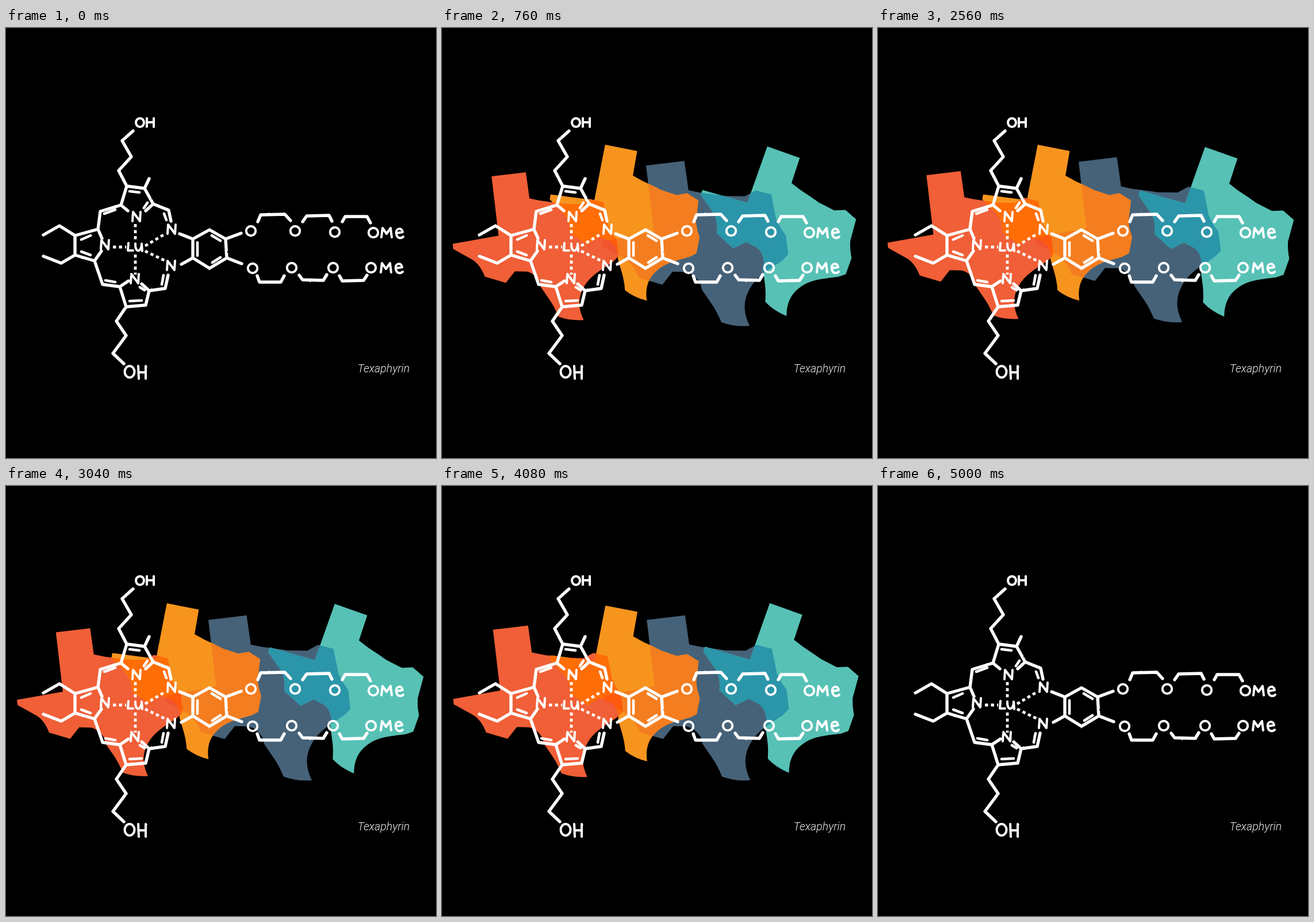
Animation of 748x748 px, one loop 5040 ms. Source, as an HTML page with a canvas:

```html
<!DOCTYPE html>
<html lang="en">
<head>
<meta charset="utf-8">
<title>Texaphyrin</title>
<style>
html, body { margin: 0; width: 100%; height: 100%; overflow: hidden; background: #000; }
canvas, svg { position: absolute; left: 0; top: 0; width: 748px; height: 748px; }
.chalk { fill: none; stroke: #fff; stroke-linecap: round; stroke-linejoin: round; filter: url(#rough); }
.bond { stroke-width: 5.4; }
.inner { stroke-width: 4.6; }
.dots { stroke-width: 4.8; stroke-linecap: butt; stroke-dasharray: 5.5 5; }
.letters { stroke-width: 4; }
text { font: italic 300 19.6px Roboto, "Liberation Sans", sans-serif; fill: #eee; }
</style>
</head>
<body>
<canvas id="stage" width="748" height="748"></canvas>
<svg viewBox="0 0 748 748">
  <defs>
    <filter id="rough" filterUnits="userSpaceOnUse" x="0" y="0" width="748" height="748" color-interpolation-filters="sRGB">
      <feTurbulence type="fractalNoise" baseFrequency=".25" numOctaves="1" seed="4"/>
      <feDisplacementMap in="SourceGraphic" scale="1.8" xChannelSelector="R" yChannelSelector="G"/>
    </filter>
    <path id="n" d="M-7 8L-6 -8L6 8L7 -8"/>
    <circle id="o" r="8.2"/>
    <path id="me" d="M653 364L655 348L662 358L669 348L671 364M679 357L690 355C689 346 677 348 679 358C680 366 687 367 691 363"/>
  </defs>
  <g class="chalk">
    <g class="bond">
      <!-- side chains -->
      <path d="M221 179L202 196L218 224L196 248L210 275M241 279L249 262M209 485L192 510L209 535L186 566L205 584"/>
      <path d="M65 360L93 344L120 361M65 397L96 409L120 395"/>
      <!-- ring -->
      <path d="M212 318L200 308L210 275L241 279L256 306L243 318M200 308L164 319L160 350L120 361L120 395L154 405L168 446L198 450M160 350L167 366M154 405L166 388"/>
      <path d="M256 306L283 317L287 336M213 440L198 450L209 485L243 482L249 457L236 445M249 457L277 453L282 430"/>
      <!-- benzene -->
      <path d="M325 367L354 351L382 367L384 400L354 418L325 400ZM302 358L325 367M325 400L305 411M382 367L409 357M384 400L410 410"/>
      <!-- ether chains -->
      <path d="M438 337L443 325L485 324L495 335M516 337L523 327L562 326L567 336M585 337L590 328L628 328L634 339"/>
      <path d="M437 431L441 442L478 442L484 431M510 430L516 438L552 439L558 429M580 431L585 440L622 439L628 430"/>
    </g>
    <path class="inner" d="M215 284L232 286M246 304L240 313M171 323L190 316M275 323L279 334M131 368L147 361M131 389L147 395M173 439L190 442M215 475L236 474M233 451L241 456M274 430L271 446M333 373L333 396M358 361L373 370M359 408L373 399"/>
    <path class="dots" d="M225 341V369M225 394V429M186 381H209M242 379L277 358M242 388L277 405"/>
    <g class="letters">
      <use href="#n" x="227" y="328"/><use href="#n" x="288" y="350"/><use href="#n" x="172" y="377"/>
      <use href="#n" x="224" y="436"/><use href="#n" x="287" y="413"/>
      <path d="M213 374L212 387L221 387M225 375C224 392 236 391 236 375L237 388"/>
      <use href="#o" x="426" y="353"/><use href="#o" x="503" y="353"/><use href="#o" x="572" y="355"/><use href="#o" x="639" y="356"/>
      <use href="#o" x="429" y="418"/><use href="#o" x="497" y="417"/><use href="#o" x="569" y="417"/><use href="#o" x="635" y="417"/>
      <use href="#me"/><use href="#me" x="-1" y="61"/>
      <ellipse cx="233" cy="164.5" rx="7" ry="7.5"/>
      <path d="M245 157V172M257 157V172M245 164H257"/>
      <ellipse cx="215" cy="598" rx="8.5" ry="10"/>
      <path d="M230 588L231 610M243 588V610M231 599H243"/>
    </g>
  </g>
  <text x="611.5" y="599">Texaphyrin</text>
</svg>
<script>
const LOOP = 5040, STEP = 40;
const ctx = document.getElementById('stage').getContext('2d');

// State outline, upright, with the panhandle corner at 0,0
const outline = new Path2D('M0 0H60L61 46Q80 53 99 57L117 62L147 66L165 59L188 68L191 107Q195 121 203 134L203 164L193 172C173 183 149 191 135 213Q119 236 130 267Q106 266 87 256Q82 238 75 225L63 202L62 192Q54 176 42 172L21 169L3 187L-32 172Q-38 148 -53 138L-81 118V109L0 104Z');
const PIVOT = [60, 130];
const KEYS = [760, 1600, 2560, 3520, 4480];

const states = {
  red: { size: 1, turn: -6.7, enter: 40, leave: 4218,
    x: [161, 159, 159, 164, 166], y: [380, 378, 378, 375, 375] },
  orange: { size: .945, turn: 11, enter: 180, leave: 4334,
    x: [316, 308, 310, 314, 318], y: [334.5, 333.5, 334.5, 336.5, 341] },
  blue: { size: 1.118, turn: -6.9, enter: 100, leave: 4470,
    x: [439, 436, 433, 439, 441], y: [375.5, 373, 369, 369.5, 369] },
  teal: { size: 1, turn: 19.5, enter: 200, leave: 4372,
    x: [579, 588, 582, 588, 580.5], y: [348.5, 348.5, 349.5, 345.5, 347] }
};

// Each entry fills the area shared by the named states
const layers = [
  ['#466279', 'blue'], ['#57c1b5', 'teal'], ['#2b95a9', 'blue', 'teal'],
  ['#f7941e', 'orange'], ['#f47d1f', 'orange', 'blue'],
  ['#f05f37', 'red'], ['#f2542e', 'red', 'blue'],
  ['#ff6d06', 'red', 'orange'], ['#ff5a0c', 'red', 'orange', 'blue']
];

function smooth(t, from, to) {
  const k = Math.min(1, Math.max(0, (t - from) / (to - from)));
  return k * k * (3 - 2 * k);
}

function drift(list, t) {
  return list.reduce((v, next, i) =>
    i ? v + (next - list[i - 1]) * smooth(t, KEYS[i - 1], KEYS[i]) : next, 0);
}

function popScale({ enter, leave }, t) {
  return 1.07 * smooth(t, enter, enter + 360) - .07 * smooth(t, enter + 360, enter + 560)
    + .075 * smooth(t, leave - 220, leave) - 1.075 * smooth(t, leave, leave + 400);
}

function shapeAt(s, t) {
  const scale = s.size * popScale(s, t);
  const path = new Path2D();
  if (scale > .002) {
    path.addPath(outline, new DOMMatrix()
      .translate(drift(s.x, t), drift(s.y, t))
      .rotate(s.turn).scale(scale).translate(-PIVOT[0], -PIVOT[1]));
  }
  return path;
}

function draw(t) {
  const shapes = {};
  for (const name in states) shapes[name] = shapeAt(states[name], t);
  ctx.clearRect(0, 0, 748, 748);
  for (const [color, first, ...others] of layers) {
    ctx.save();
    others.forEach(name => ctx.clip(shapes[name]));
    ctx.fillStyle = color;
    ctx.fill(shapes[first]);
    ctx.restore();
  }
}

const start = performance.now();
function tick() {
  const t = (performance.now() - start) % LOOP;
  draw(Math.floor(t / STEP) * STEP);
  requestAnimationFrame(tick);
}
tick();
</script>
</body>
</html>
```
